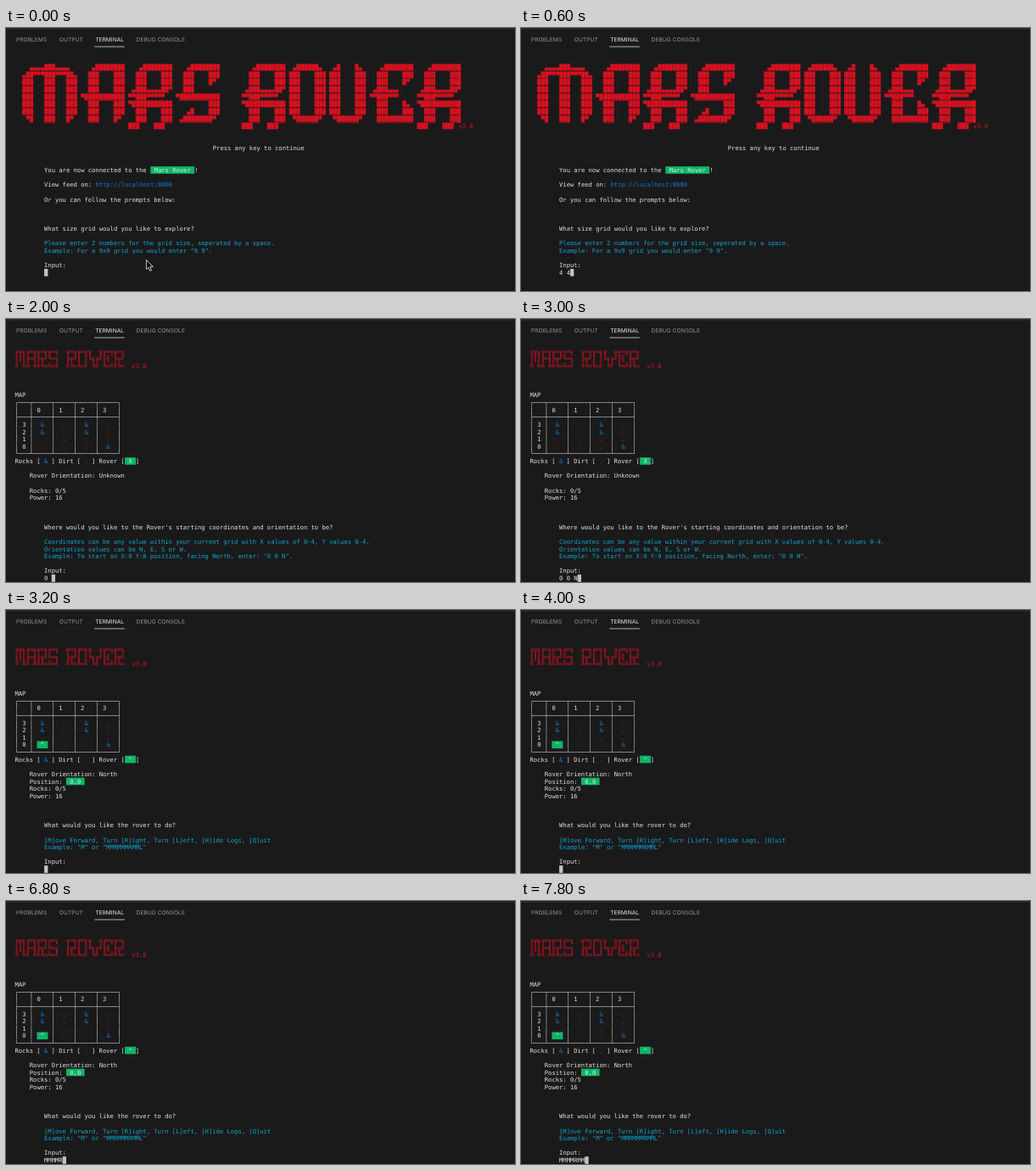
Write an HTML page that moves like this. It is 600x310 px and loops after 8 s.

```html
<!DOCTYPE html>
<html lang="en">
<head>
<meta charset="utf-8">
<title>Terminal rover</title>
<style>
  html, body { margin: 0; width: 100%; height: 100%; overflow: hidden; background: #1b1a1b; }
  svg { display: block; width: 600px; height: 310px; }
  text { white-space: pre; text-rendering: geometricPrecision; }
  .term { font: 7.175px "DejaVu Sans Mono", monospace; }
  .tabs { font: 6.7px Inter, sans-serif; }
</style>
</head>
<body>
<svg id="stage" viewBox="0 0 600 310" xmlns="http://www.w3.org/2000/svg"></svg>
<script>
const LOOP = 8000;
const CELL = 4.32, LINE = 8.63, LEFT = 10.5, BASE = 49.2, ASCENT = 6.9;
const BACK = '#1b1a1b', WHITE = '#e2e2e2', RED = '#dc1020', CYAN = '#0ba6d2', BLUE = '#0f7cd2',
      GREEN = '#0fb566', BORDER = '#cccccc', CURSOR = '#c4c4c4';

const colX = col => LEFT + col * CELL;
const rowY = row => BASE + row * LINE;

const put = (col, row, text, fill = WHITE) =>
  `<text xml:space="preserve" x="${colX(col).toFixed(2)}" y="${rowY(row).toFixed(2)}" fill="${fill}">${text.replace(/&/g, '&amp;')}</text>`;

const cell = (col, row, width, fill, id = '') =>
  `<rect ${id && `id="${id}"`} x="${colX(col).toFixed(2)}" y="${(rowY(row) - ASCENT).toFixed(2)}" width="${(width * CELL).toFixed(2)}" height="${LINE}" fill="${fill}"/>`;

const badge = (col, row, text) => cell(col, row, text.length, GREEN) + put(col, row, text, '#cdf0dd');

// Block letters: width, then rows from top to bottom
const LETTERS = {
  M: [17, '   ▄▄▄▄███▄▄▄▄| ▄██▀▀▀███▀▀▀██▄' + '| ███   ███   ███'.repeat(5) + '|  ▀█   ███   █▀'],
  A: [13, '   ▄████████' + '|  ███    ███'.repeat(3) + '|▀███████████' + '|  ███    ███'.repeat(2) + '|  ███    █▀'],
  R: [13, '   ▄████████' + '|  ███    ███'.repeat(2) + '| ▄███▄▄▄▄██▀|▀▀███▀▀▀▀▀|▀███████████' + '|  ███    ███'.repeat(3)],
  S: [13, '   ▄████████|  ███    ███|  ███    █▀|  ███|▀███████████|         ███|   ▄█    ███| ▄████████▀'],
  O: [11, ' ▄██████▄' + '|███    ███'.repeat(6) + '| ▀██████▀'],
  V: [11, ' ▄█    █▄' + '|███    ███'.repeat(6) + '| ▀██████▀'],
  E: [13, '   ▄████████|  ███    ███|  ███    █▀| ▄███▄▄▄|▀▀███▀▀▀|  ███    █▄|  ███    ███|  ██████████'],
  ' ': [5, '']
};

function banner(word) {
  let out = '';
  for (let row = 0; row < 9; row++) {
    const line = [...word].map(ch => {
      const [width, art] = LETTERS[ch];
      return (art.split('|')[row] || '').padEnd(width);
    }).join('');
    out += put(row === 8 ? -1 : 1, row, line, RED);
  }
  // Dark seams between the block characters
  const top = rowY(0) - ASCENT;
  return out + `
    <pattern id="seams" x="${LEFT}" y="${top}" width="${CELL}" height="${LINE}" patternUnits="userSpaceOnUse">
      <rect width="0.5" height="${LINE}" fill="${BACK}" opacity="0.4"/>
      <rect y="${LINE - 0.9}" width="${CELL}" height="0.9" fill="${BACK}" opacity="0.7"/>
    </pattern>
    <rect x="${LEFT}" y="${top}" width="${121 * CELL}" height="${9 * LINE}" fill="url(#seams)"/>` +
    put(121, 8, 'v3.0', RED);
}

const smallTitle = row => [
  '╔╦╗╔═╗╦═╗╔═╗  ╦═╗╔═╗╦  ╦╔═╗╦═╗',
  '║║║╠═╣╠╦╝╚═╗  ╠╦╝║ ║╚╗╔╝║╣ ╠╦╝',
  '╩ ╩╩ ╩╩╚═╚═╝  ╩╚═╚═╝ ╚╝ ╚═╝╩╚═  v3.0'
].map((line, i) => put(0, row + i, line, RED)).join('');

function map(row, rover, landed) {
  const rule = (a, b, c) => a + '───' + (b + '─────').repeat(4) + c;
  const bars = '│   ' + '│     '.repeat(4) + '│';
  let out = put(0, row, 'MAP') + put(0, row + 1, rule('┌', '┬', '┐'), BORDER) +
    put(0, row + 2, bars, BORDER) + put(6, row + 2, '0     1     2     3') +
    put(0, row + 3, rule('├', '┼', '┤'), BORDER);
  ['&.&.', '&.&.', '....', '...&'].forEach((line, i) => {
    const y = row + 4 + i;
    out += put(0, y, bars, BORDER) + put(2, y, String(3 - i));
    [...line].forEach((ch, j) => {
      const col = 7 + 6 * j;
      out += landed && i === 3 && j === 0
        ? badge(col - 1, y, ` ${rover} `)
        : put(col, y, ch, ch === '&' ? BLUE : RED);
    });
  });
  const key = row + 9;
  return out + put(0, row + 8, rule('└', '┴', '┘'), BORDER) +
    put(0, key, 'Rocks [   ] Dirt [   ] Rover [   ]') +
    put(8, key, '&', BLUE) + put(19, key, '.', RED) + badge(30, key, ` ${rover} `);
}

const welcome = banner('MARS ROVER') +
  put(54, 11, 'Press any key to continue') +
  put(8, 14, 'You are now connected to the') + badge(37, 14, ' Mars Rover ') + put(49, 14, '!') +
  put(8, 16, 'View feed on:') + put(22, 16, 'http://localhost:8080', BLUE) +
  put(8, 18, 'Or you can follow the prompts below:') +
  put(8, 22, 'What size grid would you like to explore?') +
  put(8, 24, 'Please enter 2 numbers for the grid size, seperated by a space.', CYAN) +
  put(8, 25, 'Example: For a 9x9 grid you would enter "9 9".', CYAN) +
  put(8, 27, 'Input:');

const landing = smallTitle(-1) + map(5, 'X', false) +
  put(4, 16, 'Rover Orientation: Unknown') +
  put(4, 18, 'Rocks: 0/5') + put(4, 19, 'Power: 16') +
  put(8, 23, "Where would you like to the Rover's starting coordinates and orientation to be?") +
  put(8, 25, 'Coordinates can be any value within your current grid with X values of 0-4, Y values 0-4.', CYAN) +
  put(8, 26, 'Orientation values can be N, E, S or W.', CYAN) +
  put(8, 27, 'Example: To start on X:0 Y:0 position, facing North, enter: "0 0 N".', CYAN) +
  put(8, 29, 'Input:');

const driving = smallTitle(0) + map(6, '^', true) +
  put(4, 17, 'Rover Orientation: North') +
  put(4, 18, 'Position:') + badge(14, 18, ' 0,0 ') +
  put(4, 19, 'Rocks: 0/5') + put(4, 20, 'Power: 16') +
  put(8, 24, 'What would you like the rover to do?') +
  put(8, 26, '[M]ove Forward, Turn [R]ight, Turn [L]eft, [H]ide Logs, [Q]uit', CYAN) +
  put(8, 27, 'Example: "M" or "MMRMMMRMML"', CYAN) +
  put(8, 29, 'Input:');

// Each screen: start time, prompt row, typed text and the time of each key
const SCREENS = [
  { start: 0, row: 28, art: welcome, typed: '4 4', keys: [200, 400, 600] },
  { start: 1000, row: 30, art: landing, typed: '0 0 N', keys: [1800, 2000, 2200, 2400, 2800] },
  { start: 3200, row: 30, art: driving, typed: 'MMMMRMM', keys: [4800, 5000, 5200, 5400, 6400, 7000, 7200] }
];

const tab = (x, label, fill = '#929292') => `<text x="${x}" y="15.7" fill="${fill}">${label}</text>`;

const stage = document.getElementById('stage');
stage.innerHTML = `
  <rect width="600" height="310" fill="${BACK}"/>
  <rect y="0.6" width="600" height="0.8" fill="#3a393a"/>
  <g class="tabs">
    ${tab(12, 'PROBLEMS')}${tab(62.8, 'OUTPUT')}${tab(105.2, 'TERMINAL', '#e7e7e7')}${tab(153.6, 'DEBUG CONSOLE')}
  </g>
  <rect x="104.3" y="21.6" width="35.6" height="0.8" fill="#d8d8d8"/>
  <g class="term">
    ${SCREENS.map(s => `<g class="screen">${s.art}</g>`).join('')}
    <text id="typed" xml:space="preserve" x="${colX(8)}" fill="${WHITE}"></text>
    ${cell(8, 28, 1, CURSOR, 'cursor')}
  </g>
  <path id="pointer" d="M165.4 273.2V284.4l2.5-2.3 1.8 4.2 1.9-.8-1.8-4.1h3.5z"
    fill="#080808" stroke="#f2f2f2" stroke-width="0.8" stroke-linejoin="round"/>`;

const groups = stage.querySelectorAll('.screen');
const [typed, cursor, pointer] = ['typed', 'cursor', 'pointer'].map(id => document.getElementById(id));
const show = (el, on) => el.setAttribute('display', on ? 'inline' : 'none');

function render(time) {
  const index = SCREENS.findLastIndex(s => time >= s.start);
  const { row, typed: text, keys } = SCREENS[index];
  const count = keys.filter(key => time >= key).length;
  groups.forEach((group, i) => show(group, i === index));
  typed.textContent = text.slice(0, count);
  typed.setAttribute('y', rowY(row));
  cursor.setAttribute('x', colX(8 + count));
  cursor.setAttribute('y', rowY(row) - ASCENT);
  show(pointer, time < 200);
}

const began = performance.now();
function tick() {
  render((performance.now() - began) % LOOP);
  requestAnimationFrame(tick);
}
tick();
</script>
</body>
</html>
```
